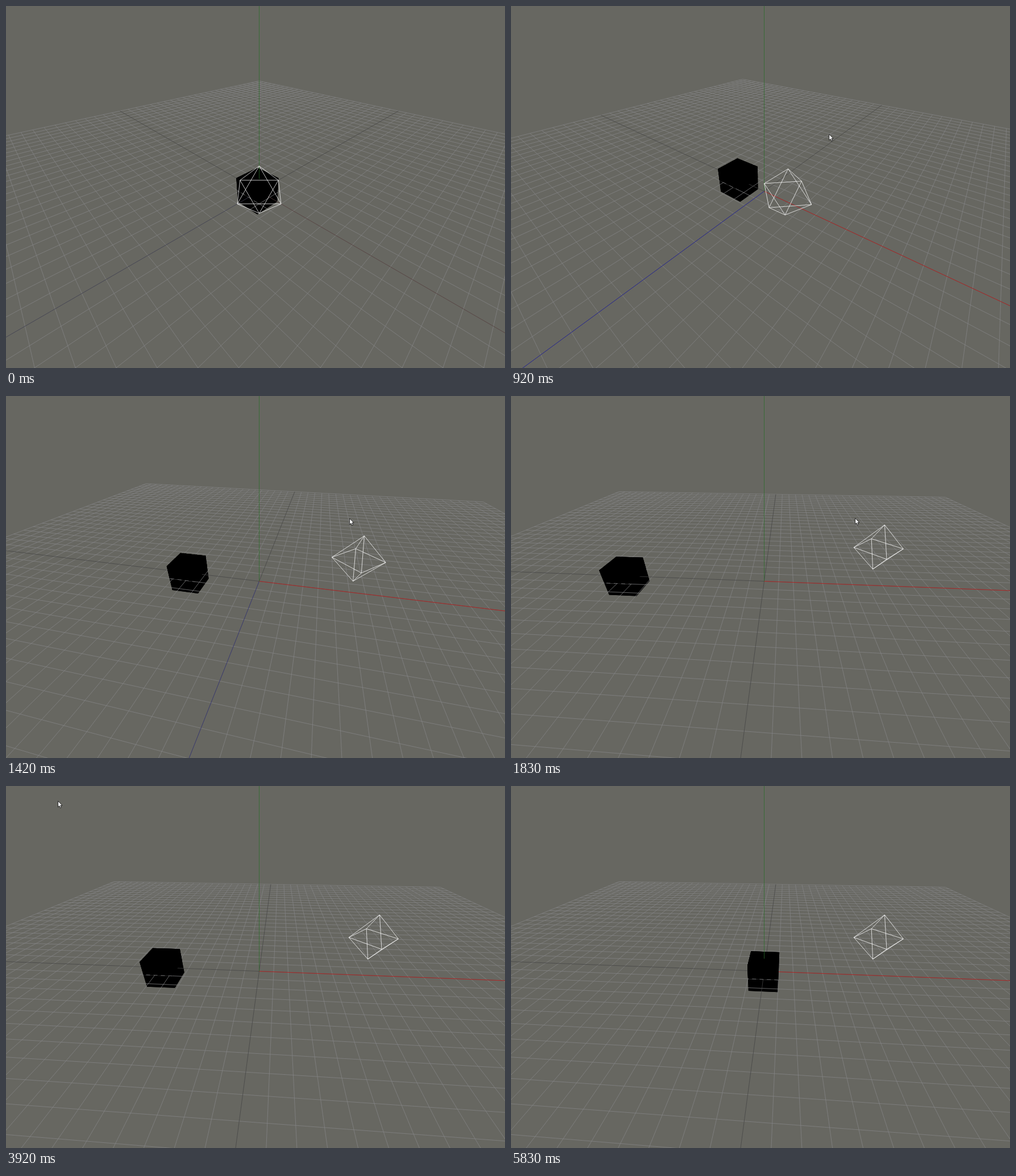
An HTML page with a canvas for the animation above (6.33 s loop, 878 by 638 pixels).

```html
<!DOCTYPE html>
<html lang="en">
<head>
<meta charset="utf-8">
<title>Cube and octahedron</title>
<style>
  html, body { margin: 0; width: 100%; height: 100%; overflow: hidden; background: #676761; }
  canvas { display: block; }
</style>
</head>
<body>
<canvas id="stage" width="878" height="638"></canvas>
<script>
const ctx = document.getElementById('stage').getContext('2d');
const LOOP = 6330, STEP = 1000 / 12, LAST = 70;
const CX = 445.5, CY = 326.5, FOCAL = 440, DIST = 10 * Math.sqrt(3), NEAR = 0.1;
const HALF = 25, LINE = 0.75, GRID = '#848486';

// Swing of the cube: time in ms, phase in degrees.
const SWING = [[0, 15], [920, 59], [1420, 93], [1830, 169], [3250, 207], [5330, 338], [5830, 358]];

// Stops of the mouse pointer: time in ms, x, y.
const POINTER = [
  [415, 212, 96], [750, 548, 228], [920, 560, 226], [1420, 605, 216], [2080, 606, 215],
  [2670, 486, 195], [3170, 104, 13], [3330, 92, 20], [4750, 91, 36], [5330, 779, 586], [5500, 812, 640]
];

const lerp = (a, b, k) => a + (b - a) * k;

function smoothstep(from, to, t) {
  const k = Math.min(1, Math.max(0, (t - from) / (to - from)));
  return k * k * (3 - 2 * k);
}

function along(stops, t) {
  const i = Math.max(1, stops.findIndex(s => s[0] >= t));
  const [a, b] = [stops[i - 1], stops[i]];
  const k = (t - a[0]) / (b[0] - a[0]);
  return a.slice(1).map((v, j) => lerp(v, b[j + 1], k));
}

// Pose of the whole scene at a time.
function pose(t) {
  const s = smoothstep(645, 1730, t);
  const bow = s * (1 - s), sag = s * Math.pow(1 - s, 1.5);
  const [phase] = along(SWING, Math.min(t, 5830));
  return {
    azimuth: lerp(45, 4.08, s),
    elevation: lerp(35.26, 32.4, s) + 8.2 * sag,
    cube: -5 * (1 - Math.cos(phase * Math.PI / 180)),
    octa: [9.13 * (s - 0.22 * bow), 0.5 * s - 2.75 * sag, -5 * (s + 0.4 * bow)],
    red: t < 700 ? 0.12 : 1,
    blue: t < 700 ? 0.12 : Math.sqrt(1 - s)
  };
}

const view = {};
function aim(azimuth, elevation) {
  const a = azimuth * Math.PI / 180, e = elevation * Math.PI / 180;
  view.sa = Math.sin(a); view.ca = Math.cos(a);
  view.se = Math.sin(e); view.ce = Math.cos(e);
}

// World to camera space: right, up, depth.
function toView([x, y, z]) {
  const toward = x * view.sa + z * view.ca;
  return [
    x * view.ca - z * view.sa,
    y * view.ce - toward * view.se,
    DIST - y * view.se - toward * view.ce
  ];
}
const toScreen = ([r, u, d]) => [CX + FOCAL * r / d, CY - FOCAL * u / d];

function addLine(a, b) {
  let p = toView(a), q = toView(b);
  if (p[2] < NEAR && q[2] < NEAR) return;
  if (p[2] > q[2]) [p, q] = [q, p];
  if (p[2] < NEAR) {
    const k = (NEAR - p[2]) / (q[2] - p[2]);
    p = p.map((v, i) => lerp(v, q[i], k));
  }
  ctx.moveTo(...toScreen(p));
  ctx.lineTo(...toScreen(q));
}

function strokeLines(color, lines, alpha = 1) {
  ctx.globalAlpha = alpha;
  ctx.strokeStyle = color;
  ctx.lineWidth = LINE;
  ctx.beginPath();
  for (const [a, b] of lines) addLine(a, b);
  ctx.stroke();
  ctx.globalAlpha = 1;
}

function fillBox(cx, low, high) {
  const at = (sx, sy, sz) => toScreen(toView([cx + sx, sy < 0 ? low : high, sz]));
  ctx.fillStyle = '#000';
  for (let axis = 0; axis < 3; axis++) {
    for (const side of [-1, 1]) {
      ctx.beginPath();
      for (const corner of [[-1, -1], [1, -1], [1, 1], [-1, 1]]) {
        const s = [...corner];
        s.splice(axis, 0, side);
        ctx.lineTo(...at(...s));
      }
      ctx.fill();
    }
  }
}

const grid = [], centre = [];
for (let i = -HALF; i <= HALF; i++) {
  (i ? grid : centre).push([[i, 0, -HALF], [i, 0, HALF]], [[-HALF, 0, i], [HALF, 0, i]]);
}

function octaEdges(pos) {
  const tip = (axis, s) => pos.map((v, i) => i === axis ? v + s : v);
  const edges = [];
  for (let a = 0; a < 3; a++)
    for (const s of [-2, 2])
      for (const r of [-2, 2]) edges.push([tip(a, s), tip((a + 1) % 3, r)]);
  return edges;
}

const arrow = new Path2D('M0 0V10.5L2.4 8.3L4 12L5.8 11.2L4.2 7.6H7.4Z');
function drawPointer([x, y]) {
  ctx.save();
  ctx.translate(x, y);
  ctx.fillStyle = '#fff';
  ctx.strokeStyle = '#000';
  ctx.lineWidth = 0.8;
  ctx.fill(arrow);
  ctx.stroke(arrow);
  ctx.restore();
}

function draw(t) {
  const { azimuth, elevation, cube, octa, red, blue } = pose(t);
  ctx.fillStyle = '#676761';
  ctx.fillRect(0, 0, 878, 638);
  aim(azimuth, elevation);

  // The floor covers the sunken half of the cube, the upper half covers the floor.
  fillBox(cube, -1, 1);
  strokeLines(GRID, grid);
  strokeLines('#444', centre);
  strokeLines('#d01c1c', [[[0, 0, 0], [HALF, 0, 0]]], red);
  strokeLines('#1c1cb4', [[[0, 0, 0], [0, 0, HALF]]], blue);
  fillBox(cube, 0, 1);
  ctx.setLineDash([7, 6]);
  strokeLines(GRID, [[[cube - 1, 0, 1], [cube + 1, 0, 1]]]);
  ctx.setLineDash([]);

  strokeLines('#2a6e2a', [[[0, cube > -1 ? 1 : 0, 0], [0, HALF, 0]]]);
  strokeLines('#fff', octaEdges(octa));
  if (t > 415 && t < 5490) drawPointer(along(POINTER, t));
}

const start = performance.now();
function tick() {
  const t = (performance.now() - start) % LOOP;
  draw(Math.min(LAST, Math.floor((t + 4) / STEP)) * STEP);
  requestAnimationFrame(tick);
}
tick();
</script>
</body>
</html>
```
